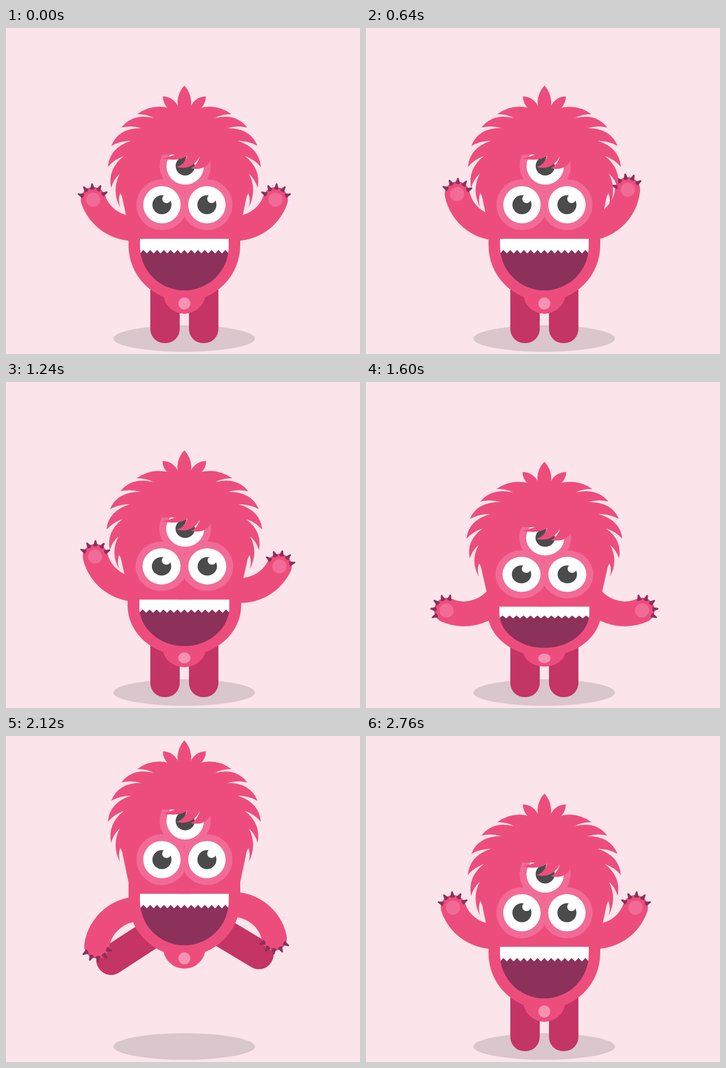
Animation, 650 px wide and 600 px high, one loop 2.8 s. Source, as an HTML page with a canvas:

```html
<!DOCTYPE html>
<html lang="en">
<head>
<meta charset="utf-8">
<title>Dancing monster</title>
<style>
html, body { margin: 0; width: 100%; height: 100%; overflow: hidden; background: #fce4eb; }
canvas { display: block; }
</style>
</head>
<body>
<canvas id="stage" width="650" height="600"></canvas>
<script>
const ctx = document.getElementById('stage').getContext('2d');
const LOOP = 2800, STEP = 40, MID = 327.5, RAD = Math.PI / 180;
const PINK = '#ed4d7d', RING = '#f26b96', DARK = '#8b315a', LEG = '#c43464';
const LID = '#d93267', PUPIL = '#4b4b4b', BELLY = '#f792b3';

const SWAY_END = 1140, LAUNCH = 1670, PEAK = 2110, LAND = 2331;
const ARMS_DOWN = 1700, ARMS_UP = 2280;

// The limbs of the two sides differ slightly in the jump.
const LEFT = { sign: 1, footX: 292, splay: 57, legDrop: 11, armDrop: 51, armTurn: 36 };
const RIGHT = { sign: -1, footX: 363, splay: 59, legDrop: 4, armDrop: 42, armTurn: 32 };

function ramp(t, from, to) {
  const p = Math.min(1, Math.max(0, (t - from) / (to - from)));
  return .5 - .5 * Math.cos(Math.PI * p);
}

function sway(t, span, power) {
  return t < span ? -Math.sin(2 * Math.PI * (t / span) ** power) : 0;
}

function jumpHeight(t) {
  if (t < LAUNCH || t > LAND) return 0;
  const u = (t - PEAK) / (t < PEAK ? PEAK - LAUNCH : LAND - PEAK);
  return 98 * (1 - u * u);
}

function squashAt(t) {
  const crouch = .22 * ramp(t, 1120, 1380) * (1 - ramp(t, 1580, 1680));
  const p = Math.max(0, (t - LAND) / (LOOP - STEP - LAND));
  const bounce = p < 1 ? .2 * (1 - p) * Math.sin(2 * Math.PI * p) : 0;
  return 1 - crouch - bounce;
}

function poseAt(t) {
  const u = Math.min(1, t / SWAY_END);
  const squash = squashAt(t);
  const headScale = 1 - .28 * (1 - squash);
  const neck = 515 - 127 * squash;
  const droop = 54 * ramp(t, 1200, 1720) * (1 - ramp(t, 2260, 2500));
  return {
    squash, headScale, neck,
    wide: 1 + Math.min(.018, .18 * (1 - squash)),
    shoulderY: neck - 21 * headScale,
    lean: (19.2 + 3.1 * u) * sway(t, SWAY_END, 1.2),
    armSway: 24.3 * sway(t, 1290, 1.05),
    armLift: 12.5 * Math.sin(Math.PI * u * u) - droop,
    jump: jumpHeight(t),
    splay: ramp(t, 1660, 1960) * (1 - ramp(t, 2140, 2340)),
    down: t >= ARMS_DOWN && t < ARMS_UP,
    closed: t >= 280 && t < 520
  };
}

function group(draw) {
  ctx.save();
  draw();
  ctx.restore();
}

function onSide(side, draw) {
  group(() => {
    if (side === RIGHT) {
      ctx.translate(2 * MID, 0);
      ctx.scale(-1, 1);
    }
    draw();
  });
}

function fillPath(color, build) {
  ctx.fillStyle = color;
  ctx.beginPath();
  build();
  ctx.fill();
}

function disc(x, y, r, color) {
  fillPath(color, () => ctx.arc(x, y, r, 0, 2 * Math.PI));
}

function turnAbout(x, y, degrees) {
  ctx.translate(x, y);
  ctx.rotate(degrees * RAD);
  ctx.translate(-x, -y);
}

function drawLeg(pose, side) {
  group(() => {
    turnAbout(side.footX, 580, pose.lean * .13);
    onSide(side, () => {
      ctx.translate(292, 435 - pose.jump + side.legDrop * pose.splay);
      ctx.rotate(side.splay * pose.splay * RAD);
      fillPath(LEG, () => ctx.roundRect(-27, 0, 54, 145, [0, 0, 26, 26]));
    });
  });
}

function drawClaw() {
  fillPath(DARK, () => {
    ctx.moveTo(-4.8, -20);
    ctx.quadraticCurveTo(-2.8, -23, -1.5, -29);
    ctx.quadraticCurveTo(0, -31.5, 1.5, -29);
    ctx.quadraticCurveTo(2.8, -23, 4.8, -20);
    ctx.quadraticCurveTo(0, -17, -4.8, -20);
  });
}

function drawArm(pose, side) {
  onSide(side, () => {
    if (pose.down) {
      ctx.translate(MID - 88.5, pose.shoulderY + side.armDrop);
      ctx.rotate((25 - side.armTurn * pose.splay) * RAD);
      ctx.scale(1, -1);
    } else {
      ctx.translate(MID - 83.5 * pose.wide, pose.shoulderY);
      ctx.rotate((pose.armLift + side.sign * pose.armSway) * RAD);
    }
    ctx.strokeStyle = PINK;
    ctx.lineWidth = 46;
    ctx.lineCap = 'round';
    ctx.beginPath();
    ctx.arc(-9, -77, 79, 161 * RAD, 75 * RAD, true);
    ctx.stroke();
    ctx.translate(-84, -51);
    if (!pose.down) disc(0, 0, 13, RING);
    for (let i = -2; i <= 2; i++) {
      group(() => {
        ctx.rotate((32.5 * i - 4) * RAD);
        drawClaw();
      });
    }
  });
}

function mouthPath() {
  ctx.moveTo(246, 388);
  ctx.lineTo(409, 388);
  ctx.lineTo(409, 401.5);
  ctx.arc(MID, 401.5, 81.5, 0, Math.PI);
  ctx.closePath();
}

function drawLowerBody() {
  fillPath(PINK, () => {
    ctx.moveTo(225, 380);
    ctx.lineTo(225, 400);
    ctx.arc(MID, 400, 102.5, Math.PI, 0, true);
    ctx.lineTo(430, 380);
  });
  disc(MID, 487, 39, PINK);
  disc(MID, 507, 11, BELLY);
  fillPath(DARK, mouthPath);
  group(() => {
    ctx.beginPath();
    mouthPath();
    ctx.clip();
    fillPath('#fff', () => {
      const half = 163 / 26;
      ctx.moveTo(246, 380);
      for (let i = 0; i <= 26; i++) ctx.lineTo(246 + i * half, i % 2 ? 408.5 : 415);
      ctx.lineTo(409, 380);
    });
  });
}

function hairPoint(angle, radius) {
  return [MID - radius * Math.cos(angle * RAD), 254 - radius * Math.sin(angle * RAD)];
}

function drawHairHalf() {
  fillPath(PINK, () => {
    ctx.moveTo(340, 147);
    ctx.lineTo(298, 147);
    // Sickle-shaped locks fan out from the crown to the cheek.
    for (let i = 0; i < 6; i++) {
      const angle = 47.6 - 16.1 * i;
      const tip = 140.5 - .0052 * Math.max(0, angle) ** 2;
      const notch = 104.5 + .93 * i * i;
      ctx.quadraticCurveTo(...hairPoint(angle + 14.5, tip + 1), ...hairPoint(angle, tip));
      ctx.quadraticCurveTo(...hairPoint(angle + 6, (tip + notch) / 2 + 3), ...hairPoint(angle + 10, notch));
    }
    ctx.lineTo(213, 310);
    ctx.lineTo(225, 367);
    ctx.lineTo(225, 388);
    ctx.lineTo(340, 388);
  });
  fillPath(PINK, () => {
    ctx.moveTo(299, 150);
    ctx.quadraticCurveTo(288, 139, 288, 126);
    ctx.quadraticCurveTo(308, 126, 318, 148);
  });
  fillPath(PINK, () => {
    ctx.moveTo(330, 150);
    ctx.lineTo(317, 150);
    ctx.bezierCurveTo(312, 135, 317, 117, MID, 106);
    ctx.lineTo(330, 110);
  });
}

function drawEye(x, y, closed) {
  disc(x, y, 34.3, closed ? LID : '#fff');
  if (closed) {
    ctx.strokeStyle = DARK;
    ctx.lineWidth = 5;
    ctx.lineCap = 'round';
    ctx.beginPath();
    ctx.moveTo(x - 11, y + 4);
    ctx.quadraticCurveTo(x, y + 10, x + 11, y + 4);
    ctx.stroke();
  } else {
    disc(x, y, 17.5, PUPIL);
    disc(x + 8.5, y - 11, 8, '#fff');
  }
}

function drawFringe() {
  fillPath(PINK, () => {
    ctx.moveTo(278, 200);
    ctx.lineTo(278, 233);
    ctx.lineTo(310, 233);
    for (let i = 0; i < 3; i++) {
      const rootX = 310 + 23 * i, tipX = 287 + 26 * i, tipY = 240 + i * (23 - 7 * i);
      ctx.quadraticCurveTo(rootX - 6, tipY - 4, tipX, tipY);
      ctx.quadraticCurveTo(tipX + 29, tipY + 7, rootX + 23, 235 + i);
    }
    ctx.lineTo(380, 200);
  });
}

function drawHead(closed) {
  onSide(LEFT, drawHairHalf);
  onSide(RIGHT, drawHairHalf);
  const eyes = [[329, 254], [286.3, 325.3], [368.9, 325.3]];
  for (const [x, y] of eyes) disc(x, y, 46.8, RING);
  for (const [x, y] of eyes) drawEye(x, y, closed);
  drawFringe();
}

function drawScaled(pose, scaleY, localY, stageY, draw) {
  group(() => {
    ctx.translate(MID, stageY);
    ctx.scale(pose.wide, scaleY);
    ctx.translate(-MID, -localY);
    draw();
  });
}

function render(t) {
  const pose = poseAt(t);
  ctx.fillStyle = '#fce4eb';
  ctx.fillRect(0, 0, 650, 600);
  fillPath('#dac6cd', () => ctx.ellipse(327.3, 571.5, 130, 24.5, 0, 0, 2 * Math.PI));
  for (const side of [LEFT, RIGHT]) drawLeg(pose, side);
  group(() => {
    const lift = 4.6 * (pose.lean / 20.5) ** 2;
    ctx.translate(0, -lift - pose.jump);
    turnAbout(MID, 462, pose.lean);
    for (const side of [LEFT, RIGHT]) drawArm(pose, side);
    drawScaled(pose, pose.squash, 515, 515, drawLowerBody);
    drawScaled(pose, pose.headScale, 388, pose.neck, () => drawHead(pose.closed));
  });
}

function tick() {
  const t = performance.now() % LOOP;
  render(Math.floor(t / STEP) * STEP);
  requestAnimationFrame(tick);
}
tick();
</script>
</body>
</html>
```
